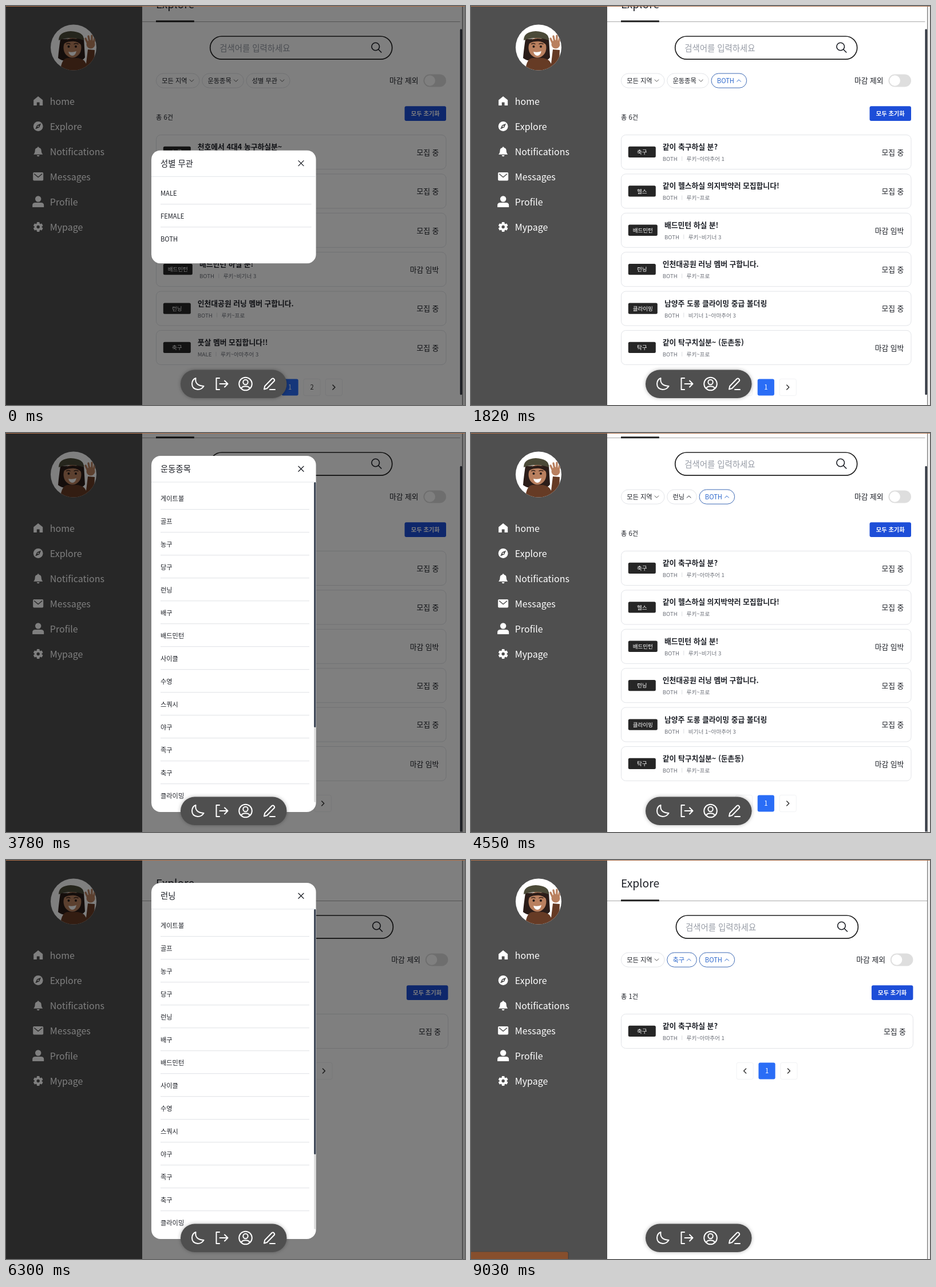
Recreate the animation shown at these times as an HTML page. Size 802 px wide and 698 px high, loop 9.1 s.

```html
<!DOCTYPE html>
<html lang="ko">
<head>
<meta charset="utf-8">
<style>
html, body { margin: 0; width: 100%; height: 100%; overflow: hidden; background: #fff; }
svg { display: block; font-family: "Noto Sans CJK KR", "Noto Sans KR", "Noto Sans CJK", "Noto Sans", sans-serif; }
</style>
</head>
<body>
<svg id="stage" width="802" height="698" viewBox="0 0 802 698"></svg>
<script>
const LOOP = 9100, PITCH = 68.4, INK = '#1c1f26', LINE = '#e2e4e8', GRAY = '#4f4f4f';
const stage = document.getElementById('stage');

// Cards: sport, title, gender, level, closing soon
const hoops = ['농구', '천호에서 4대4 농구하실분~', 'MALE', '루키~세미프로 2'];
const soccer = ['축구', '같이 축구하실 분?', 'BOTH', '루키~아마추어 1'];
const gym = ['헬스', '같이 헬스하실 의지박약러 모집합니다!', 'BOTH', '루키~프로'];
const shuttle = ['배드민턴', '배드민턴 하실 분!', 'BOTH', '루키~비기너 3', true];
const run = ['런닝', '인천대공원 러닝 멤버 구합니다.', 'BOTH', '루키~프로'];
const futsal = ['축구', '풋살 멤버 모집합니다!!', 'MALE', '루키~아마추어 3'];
const climb = ['클라이밍', '남양주 도롱 클라이밍 중급 볼더링', 'BOTH', '비기너 1~아마추어 3'];
const pingpong = ['탁구', '같이 탁구치실분~ (둔촌동)', 'BOTH', '루키~프로', true];
const allCards = [hoops, soccer, gym, shuttle, run, futsal];
const bothCards = [soccer, gym, shuttle, run, climb, pingpong];

const genders = ['MALE', 'FEMALE', 'BOTH'];
const sports = ['게이트볼', '골프', '농구', '당구', '런닝', '배구', '배드민턴', '사이클', '수영',
  '스쿼시', '야구', '족구', '축구', '클라이밍'];
const chipWidth = { '모든 지역': 76, '운동종목': 73, '성별 무관': 76.5, '런닝': 52, '축구': 52, 'BOTH': 62 };

const rect = (x, y, w, h, r, fill, extra = '') =>
  `<rect x="${x}" y="${y}" width="${w}" height="${h}" rx="${r}" fill="${fill}" ${extra}/>`;
const box = (x, y, w, h, r, stroke, sw = 1) => rect(x, y, w, h, r, '#fff', `stroke="${stroke}" stroke-width="${sw}"`);
const circle = (x, y, r, fill, extra = '') => `<circle cx="${x}" cy="${y}" r="${r}" fill="${fill}" ${extra}/>`;
const fillPath = (d, fill) => `<path d="${d}" fill="${fill}"/>`;
const strokePath = (d, color, w = 1.2) =>
  `<path d="${d}" fill="none" stroke="${color}" stroke-width="${w}" stroke-linecap="round" stroke-linejoin="round"/>`;
// Text is placed by the vertical middle of its line
const text = (x, mid, size, str, fill = INK, weight = 400, anchor = 'start') =>
  `<text x="${x}" y="${mid + size * .36}" font-size="${size}" fill="${fill}" font-weight="${weight}" text-anchor="${anchor}">${str}</text>`;
const shift = (x, y, body) => `<g transform="translate(${x} ${y})">${body}</g>`;
const mix = (a, b, k) => `rgb(${a.map((v, i) => Math.round(v + (b[i] - v) * k))})`;
const clamp = v => Math.max(0, Math.min(1, v));

function track(points, t) {
  let [t0, v0] = points[0];
  for (const [t1, v1] of points) {
    if (t < t1) return v0 + (v1 - v0) * clamp((t - t0) / (t1 - t0 || 1));
    [t0, v0] = [t1, v1];
  }
  return v0;
}
const scrollPath = [[0, 44], [2460, 44], [2520, 36], [2590, 16], [2660, 0], [2729, 1], [2780, 1],
  [2800, 22], [2870, 47], [3000, 50], [3010, 58], [3080, 63]];

const avatar = `<clipPath id="face"><circle cx="118" cy="72.5" r="40"/></clipPath>` + circle(118, 72.5, 40, '#fff') +
  `<g clip-path="url(#face)">` +
  fillPath('M95 58 Q92 78 91 91 Q101 99 115 94 Q132 99 138 90 Q137 72 136 56Z', '#2b1d19') +
  fillPath('M95 115 Q96 93 107 91 L126 91 Q137 93 140 101 L143 76 L155 77 Q155 102 147 115Z', '#663b25') +
  circle(148, 67, 7.5, '#b9805f') +
  strokePath('M143 66L139 57M146 63L144 53M150 62L150 52M153 65L155 56', '#b9805f', 3.4) +
  `<ellipse cx="116" cy="73" rx="15.5" ry="17.5" fill="#b9805f"/>` +
  fillPath('M98 70 Q100 58 116 57 Q132 57 134 70 Q124 60 114 62 Q103 62 98 70Z', '#2b1d19') +
  fillPath('M92 60 Q92 45 113 44 Q137 45 136 60 Q114 52 92 60Z', '#4b4a38') +
  circle(109.5, 71, 2, '#241a18') + circle(122, 71, 2, '#241a18') +
  strokePath('M105.5 66.5Q109 64.5 112 66.5M119 66.5Q122 64.5 126 66.5', '#3a251d', 1.4) +
  fillPath('M109 80 Q116 82 123 79 Q121 87 116 87 Q111 87 109 80Z', '#fff') + `</g>`;

const gearTeeth = [0, 60, 120].map(a => rect(-2.4, -8.4, 4.8, 16.8, 1, '#fff', `transform="rotate(${a})"`)).join('');
const navIcons = [
  fillPath('M0 -8.5L8 -2V7.5H2.4V2H-2.4V7.5H-8V-2Z', '#fff'),
  circle(0, 0, 8.4, '#fff') + fillPath('M5 -5L2 2L-5 5L-2 -2Z', GRAY) + circle(0, 0, 1.2, '#fff'),
  fillPath('M-1.2 -8H1.2V-6.8Q5.6 -6 5.6 -1Q5.6 3.2 8 5.2H-8Q-5.6 3.2 -5.6 -1Q-5.6 -6 -1.2 -6.8ZM-2.4 6.4H2.4Q2 8.8 0 8.8Q-2 8.8 -2.4 6.4Z', '#fff'),
  rect(-9, -7.5, 18, 14.5, 1.8, '#fff') + strokePath('M-6.5 -4.5L0 1L6.5 -4.5', GRAY, 1.5),
  circle(0, -5, 5.2, '#fff') + fillPath('M-10 9.5V6Q-10 1.5 -5 1.5H5Q10 1.5 10 6V9.5Z', '#fff'),
  gearTeeth + circle(0, 0, 6.4, '#fff') + circle(0, 0, 2.7, GRAY)
];
const sidebar = avatar + ['home', 'Explore', 'Notifications', 'Messages', 'Profile', 'Mypage'].map((label, i) =>
  shift(56.2, 166.5 + 44 * i, navIcons[i]) + text(76.8, 167.2 + 44 * i, 16, label, '#fff')).join('');

const dock = `<g style="filter:drop-shadow(0 0 3px rgba(0,0,0,.3))">` + rect(305, 636.5, 185.5, 49.5, 24.7, GRAY) + `</g>` +
  strokePath('M331.5 651Q329.5 664 345.5 665Q342 671 335 671Q325 670 325 661Q325.5 653 331.5 651Z', '#fff', 2) +
  strokePath('M373 651H367.5V671H373M373.5 661H387M382 655.5L387.5 661L382 666.5', '#fff', 2) +
  circle(418.5, 661, 11.3, 'none', 'stroke="#fff" stroke-width="2"') +
  circle(418.5, 658, 4.2, 'none', 'stroke="#fff" stroke-width="2"') +
  strokePath('M411 669Q412.5 665.3 418.5 665.3Q424.5 665.3 426 669', '#fff', 2) +
  strokePath('M451 670.5L452.2 665L464.5 652.2Q466.5 650.8 468.3 652.6Q470 654.5 468.5 656.3L456 669ZM461 671H470', '#fff', 2);

function chips(labels, y) {
  let x = 262.4;
  return labels.map(([label, on, up]) => {
    const w = chipWidth[label], cx = x + w - 14, s = up ? -1 : 1;
    const ink = mix([28, 31, 38], [45, 104, 205], on);
    const out = box(x, y - 12.6, w - .4, 25.2, 12.6, mix([226, 228, 232], [60, 105, 180], on)) +
      text(x + 9.8, y, 11.2, label, ink) +
      strokePath(`M${cx - 3.4} ${y - 1.7 * s}L${cx} ${y + 1.7 * s}L${cx + 3.4} ${y - 1.7 * s}`, on ? ink : '#555', 1);
    x += w + 4.3;
    return out;
  }).join('');
}

function card([sport, title, gender, level, closing], y, right) {
  const wide = sport.length > 3, x = wide ? 338 : 334.8, tagW = wide ? 51 : 48;
  const sep = x + (gender === 'BOTH' ? 33.8 : 32.2);
  return box(262.5, y, right - 262.5, 60, 8, LINE) +
    rect(274.8, y + 20.3, tagW, 19.3, 2.5, '#262626') +
    text(274.8 + tagW / 2, y + 30.3, 9.6, sport, '#fff', 400, 'middle') +
    text(x, y + 20.9, 12.8, title, INK, 700) +
    text(x, y + 42, 9.6, gender, '#6b6f78') + rect(sep - .5, y + 37.5, 1, 8, 0, '#dcdfe3') +
    text(sep + 8, y + 42, 9.6, level, '#6b6f78') +
    text(right - 12.6, y + 30.6, 12.8, closing ? '마감 임박' : '모집 중', INK, 500, 'end');
}

function pages(center, y, count) {
  return Array.from({ length: count + 2 }, (_, i) => {
    const x = center + (i - (count + 1) / 2) * 38.4, dir = i ? 1 : -1;
    if (i === 1) return rect(x - 14.6, y - 14.6, 29.2, 29.2, 3, '#2a6df6') + text(x, y, 11.2, 1, '#fff', 400, 'middle');
    return box(x - 14.6, y - 14.6, 29.2, 29.2, 3, '#f1f2f4') + (i > count || !i
      ? strokePath(`M${x - 2 * dir} ${y - 4}L${x + 2 * dir} ${y}L${x - 2 * dir} ${y + 4}`, '#333', 1.5)
      : text(x, y, 11.2, i, '#333', 400, 'middle'));
  }).join('');
}

function page(s) {
  const edge = s.bar ? 793.5 : 797, right = s.bar ? 769 : 772.4, mid = s.bar ? 515.7 : 517.4;
  const last = 269.5 + (s.cards.length - 1) * PITCH + 60;
  return rect(238, 71, edge - 238, 1, 0, '#a9a9a9') + rect(262, 69.3, 66.8, 3, 0, '#1f1f1f') +
    text(262, 41, 19.2, 'Explore') +
    box(mid - 159, 97, 318, 40.2, 20.1, '#1f1f1f', 1.7) + text(mid - 142.4, 117.4, 14.4, '검색어를 입력하세요', '#969ba5') +
    circle(mid + 130, 115, 6.8, 'none', `stroke="${INK}" stroke-width="1.6"`) +
    strokePath(`M${mid + 135} 120L${mid + 140} 125`, INK, 1.7) +
    chips([['모든 지역', 0, false], [s.sport, s.sportOn, s.sport !== '운동종목'],
      [s.gender, s.genderOn, s.gender === 'BOTH']], 174.6) +
    text(right - 48.4, 174.8, 12.8, '마감 제외', INK, 400, 'end') +
    rect(right - 39.6, 163.5, 39.6, 22, 11, '#dedede') + circle(right - 28.4, 174.5, 9.3, '#fff') +
    text(262, 238.8, 11.2, `총 ${s.cards.length}건`) +
    rect(right - 72.5, 219.3, 72.5, 25.8, 3, '#1d4ed8') + text(right - 36.3, 232.4, 10.24, '모두 초기화', '#fff', 700, 'middle') +
    s.cards.map((c, i) => card(c, 269.5 + i * PITCH, right)).join('') +
    pages(mid - .4, last + 39.5, s.cards === allCards ? 2 : 1);
}

function modal(title, options, top, height, lineEnd) {
  const long = options.length > 3, first = top + (long ? 74.6 : 75.2);
  return `<clipPath id="panel"><rect x="254" y="${top}" width="287.6" height="${height}" rx="16"/></clipPath><g clip-path="url(#panel)">` +
    rect(254, top, 288, height, 0, '#fff') + rect(254, top + 45.4, 288, 1, 0, LINE) +
    text(270, top + 23.2, 14.4, title, INK, 500) +
    strokePath(`M511 ${top + 18.2}l9 9m0 -9l-9 9`, INK, 1.3) +
    options.map((o, i) => text(270, first + i * 40, 11.2, o) +
      (i < options.length - 1 ? rect(270, first + 18.6 + i * 40, lineEnd - 270, 1, 0, '#dfe1e5') : '')).join('') +
    (long ? rect(538.2, top + 46, 3.4, 560, 1.7, '#dcdcdc') + rect(538.2, top + 46, 3.4, 429, 1.7, '#374151') : '') + `</g>`;
}

function draw(t) {
  const scroll = t < 5040 ? track(scrollPath, t) : 0;
  const bar = t < 5040;
  const state = {
    bar,
    cards: t < 1470 ? allCards : t < 5040 ? bothCards : t < 8750 ? [run] : [soccer],
    sport: t < 4550 ? '운동종목' : t < 8330 ? '런닝' : '축구',
    sportOn: clamp((t - 4550) / 150),
    gender: t < 1050 ? '성별 무관' : 'BOTH',
    genderOn: clamp((t - 1050) / 150)
  };
  const popup = t < 1050 ? modal('성별 무관', genders, 252.4, 198, 533.6)
    : t >= 3640 && t < 4550 ? modal('운동종목', sports, 40, 623, 530)
    : t >= 6300 && t < 8330 ? modal('런닝', sports, 40, 623, 530) : '';
  const nudge = t >= 2725 && t < 2800 ? -1 : 0;
  // Link hint: shows with each new list, then fades in three steps
  const hint = [[1470, 1680], [5040, 5250], [8750, 9030]].reduce((a, [from, out]) =>
    t < from ? a : t < out ? 1 : Math.max(0, 1 - (Math.floor((t - out) / 70) + 1) / 3), 0);

  return rect(0, 0, 802, 698, 0, '#fff') + shift(0, -scroll, page(state)) +
    rect(0, 0, 238, 698, 0, GRAY) + shift(0, nudge, sidebar) +
    (bar ? rect(793.4, scroll * .917, 3.4, 640, 1.7, '#2f3540') : '') +
    rect(797, 0, 1, 698, 0, '#666') + rect(798, 0, 4, 698, 0, '#efefef') +
    (popup && rect(0, 0, 802, 698, 0, '#000', 'opacity=".5"') + popup) + dock +
    rect(0, 0, 802, 1, 0, '#b0704a') +
    (hint ? `<g opacity="${hint}">` + rect(-6, 684.8, 177, 22, 4, '#000', 'opacity=".25"') +
      rect(-6, 685.6, 175.6, 22, 3, '#a4501d') + `</g>` : '');
}

let shown = '';
function tick() {
  const next = draw(performance.now() % LOOP);
  if (next !== shown) stage.innerHTML = shown = next;
  requestAnimationFrame(tick);
}
tick();
</script>
</body>
</html>
```
